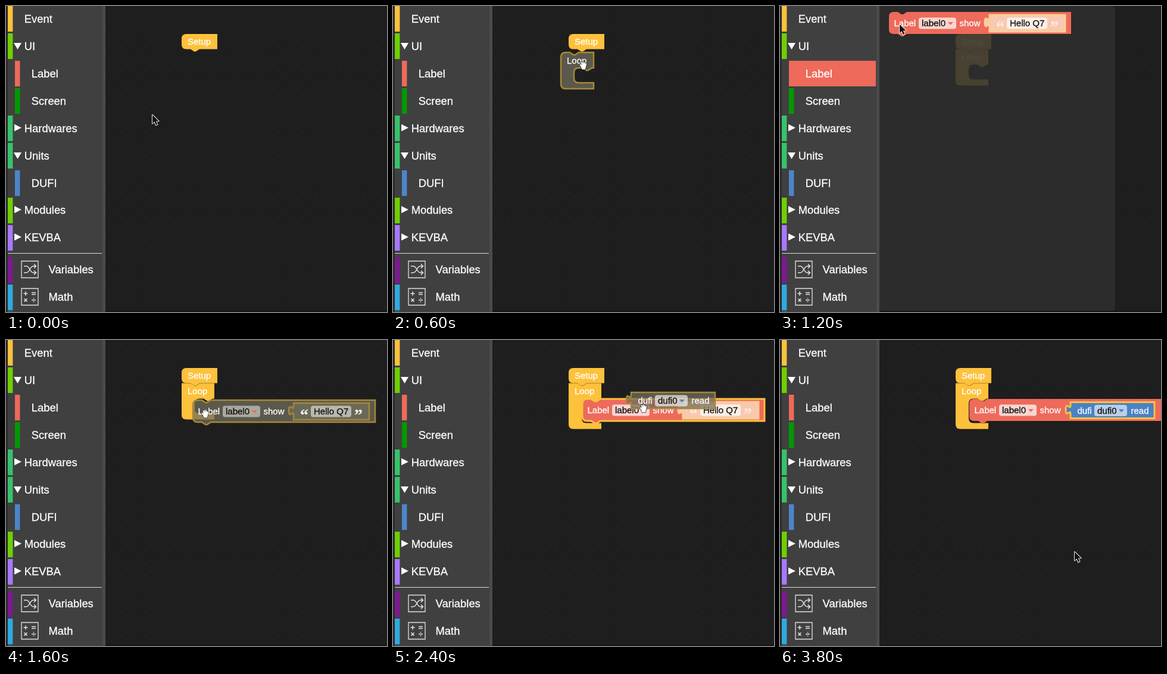
Recreate the animation shown at these times as an HTML page with a canvas. Size 640x514 px, loop 4 s.

```html
<!DOCTYPE html>
<html lang="en">
<head>
<meta charset="utf-8">
<title>Block editor</title>
<style>
html, body { margin: 0; width: 100%; height: 100%; overflow: hidden; background: #1e1e1e; }
canvas { display: block; width: 640px; height: 514px; }
</style>
</head>
<body>
<canvas id="stage" width="640" height="514"></canvas>
<script>
const c = document.getElementById('stage').getContext('2d');
const SANS = '"Liberation Sans", Arial, sans-serif';
const YELLOW = '#fdc13c', RED = '#ee6a5b', BLUE = '#4a82c6';
const GHOST = 'rgba(112,110,92,.74)', GOLD = '#a5883a';

// name, row centre, bar colour, indent, arrow
const rows = [
  ['Event', 21, YELLOW, 0],
  ['UI', 67, '#6ed000', 0, 'down'],
  ['Label', 113, RED, 1],
  ['Screen', 159, '#009a00', 1],
  ['Hardwares', 205, '#37c26c', 0, 'right'],
  ['Units', 251, '#37c26c', 0, 'down'],
  ['DUFI', 297, '#4d86cb', 1],
  ['Modules', 342.5, '#6ed000', 0, 'right'],
  ['KEVBA', 388.5, '#a978ff', 0, 'right'],
  ['Variables', 442.5, '#7d1a91', 2],
  ['Math', 488.5, '#30a9de', 2]
];

// Each step lasts 200 ms. Stage: 0 setup, 1 loop just placed, 2 loop, 3 label, 4 sensor.
const steps = [
  { stage: 0, cur: ['arrow', 246, 183] },
  { stage: 0, row: 0, open: 'event', cur: ['arrow', 92, 22] },
  { stage: 0, row: 0, open: 'event', cur: ['arrow', 221, 31] },
  { stage: 0, drag: ['loop', 282, 78], cur: ['hand', 313, 93] },
  { stage: 1, cur: ['hand', 322, 90] },
  { stage: 1, row: 2, cur: ['arrow', 61, 107] },
  { stage: 2, row: 2, open: 'label', cur: ['arrow', 201, 31] },
  { stage: 2, drag: ['label', 262, 78], cur: ['hand', 276, 94] },
  { stage: 2, drag: ['label', 314, 101], cur: ['hand', 328, 117] },
  { stage: 3, cur: ['hand', 332, 114] },
  { stage: 3, row: 6, cur: ['arrow', 94, 300] },
  { stage: 3, row: 6, open: 'sensor', cur: ['arrow', 198, 30] },
  { stage: 3, drag: ['sensor', 400, 88], cur: ['hand', 414, 108] },
  { stage: 3, drag: ['sensor', 491, 108], cur: ['hand', 504, 128] },
  { stage: 4, cur: ['hand', 500, 125] },
  { stage: 4, cur: ['hand', 500, 125] },
  { stage: 4, cur: ['arrow', 502, 220] },
  { stage: 4, cur: ['arrow', 495, 356] },
  { stage: 4, cur: ['arrow', 495, 356] },
  { stage: 4, cur: ['arrow', 495, 356] }
];

function rect(x, y, w, h, fill) {
  c.fillStyle = fill;
  c.fillRect(x, y, w, h);
}

function round(x, y, w, h, r, fill) {
  c.fillStyle = fill;
  c.beginPath();
  c.roundRect(x, y, w, h, r);
  c.fill();
}

function poly(fill, ...p) {
  c.fillStyle = fill;
  c.beginPath();
  for (let i = 0; i < p.length; i += 2) c.lineTo(p[i], p[i + 1]);
  c.closePath();
  c.fill();
}

// A hairline stroke gives the slightly heavy screen weight
function text(s, x, y, fill = '#fff', font = '15px ' + SANS) {
  c.font = font;
  c.fillStyle = c.strokeStyle = fill;
  c.lineWidth = .3;
  c.fillText(s, x, y);
  c.strokeText(s, x, y);
}

// Text centred on a block line
const word = (s, x, mid) => text(s, x + .5, mid + 5);

function field(s, x, mid, w, color, fill = 'rgba(255,255,255,.72)', drop = true) {
  round(x, mid - 9.5, w, 19, 4, fill);
  text(s, x + 5, mid + 5, '#111');
  if (drop) {
    const r = x + w;
    poly(color, r - 14, mid - 2, r - 5, mid - 2, r - 9.5, mid + 3);
  }
}

function shape(x, y, w, h, o) {
  const p = new Path2D();
  const r = o.tab ? 0 : 8;
  const head = o.joined ? 0 : r;
  p.moveTo(x, y + head);
  p.quadraticCurveTo(x, y, x + head, y);
  if (o.top) {
    p.lineTo(x + 15, y);
    p.lineTo(x + 21, y + 4);
    p.lineTo(x + 24, y + 4);
    p.lineTo(x + 30, y);
  }
  p.lineTo(x + w, y);
  if (o.mouth) {
    const a = y + 26, b = a + o.mouth;
    p.lineTo(x + w, a);
    p.lineTo(x + 52, a);
    p.lineTo(x + 46, a + 4);
    p.lineTo(x + 43, a + 4);
    p.lineTo(x + 37, a);
    p.lineTo(x + 30, a);
    p.quadraticCurveTo(x + 22, a, x + 22, a + 8);
    p.lineTo(x + 22, b - 8);
    p.quadraticCurveTo(x + 22, b, x + 30, b);
    p.lineTo(x + w, b);
  }
  p.lineTo(x + w, y + h);
  if (o.bottom) {
    p.lineTo(x + 30, y + h);
    p.lineTo(x + 24, y + h + 4);
    p.lineTo(x + 21, y + h + 4);
    p.lineTo(x + 15, y + h);
  }
  p.lineTo(x + r, y + h);
  p.quadraticCurveTo(x, y + h, x, y + h - r);
  if (o.tab) {
    p.lineTo(x, y + 20);
    p.bezierCurveTo(x, y + 10, x - 8, y + 28, x - 8, y + 12.5);
    p.bezierCurveTo(x - 8, y - 3, x, y + 15, x, y + 5);
  }
  p.closePath();
  return p;
}

function block(x, y, w, h, fill, o = {}) {
  const p = shape(x, y, w, h, o);
  if (!o.ghost) {
    c.save();
    c.translate(.7, .7);
    c.fillStyle = 'rgba(0,0,0,.2)';
    c.fill(p);
    c.restore();
  }
  c.fillStyle = o.ghost ? GHOST : fill;
  c.fill(p);
  if (o.line || o.ghost) {
    c.lineWidth = o.ghost ? 2.5 : 3;
    c.strokeStyle = o.ghost ? GOLD : o.line;
    c.stroke(p);
  }
}

function cBlock(x, y, w, mouth = 24, o = {}) {
  block(x, y, w, 36 + mouth, YELLOW, { mouth, ...o });
}

function setup() {
  block(295, 47, 60, 25.5, YELLOW, { bottom: true });
  word('Setup', 304.5, 60);
}

function loop(x, y, mouth = 25, o = {}) {
  cBlock(x, y, 55, mouth, { top: true, ...o });
  word('Loop', x + 9.5, y + 13.5);
}

function label(x, y, w, o = {}) {
  const mid = y + 19;
  block(x, y, w, 37, RED, { top: true, bottom: true, ...o });
  word('Label', x + 8, mid);
  field('label0', x + 50, mid, 63, RED, o.ghost ? '#aaa99f' : undefined);
  word('show', x + 118, mid);
  if (o.full) return;
  const quote = o.ghost ? '#f2f0e4' : '#fdebdc';
  block(x + 169, y + 5, 127, 28, '#f8c9b0', { tab: true, ghost: o.ghost, line: '#fbcf92' });
  const big = 'bold 28px "Liberation Serif", Times, serif';
  text('“', x + 180, mid + 15, quote, big);
  text('”', x + 271, mid + 15, quote, big);
  field('Hello Q7', x + 198, mid, 68, RED, o.ghost ? '#b9b8ac' : '#fdeee6', false);
}

function sensor(x, y, o = {}) {
  const mid = y + 14;
  block(x, y, 141, 27, BLUE, { tab: true, ...o });
  word('dufi', x + 11, mid);
  field('dufi0', x + 40, mid, 55, BLUE, 'rgba(255,255,255,.62)');
  word('read', x + 101, mid);
}

function eventBlocks() {
  const f = (s, x, mid, w, drop) => field(s, x, mid, w, '#efb43a', '#fff0cb', drop);
  loop(182.5, 10);

  cBlock(183, 98, 212);
  word('Button', 192, 111);
  f('A', 241, 111, 33);
  f('wasPressed', 284, 111, 104);

  block(183, 186, 255, 26, YELLOW, { tab: true });
  word('obtain button', 192.5, 199);
  f('A', 284, 199, 33);
  f('wasPressed', 327, 199, 104);

  cBlock(183, 237, 197);
  word('Button', 192, 250);
  f('A', 240, 250, 33);
  word('+', 280, 250);
  f('B', 292, 250, 34);
  word('press', 331.5, 250);

  block(183, 325, 142, 26, YELLOW, { tab: true });
  f('A', 188, 338, 33);
  word('is', 226, 338);
  f('pressed', 241, 338, 77);

  cBlock(183, 375, 163);
  word('timer callback', 192.5, 388);
  f('timer1', 288, 388, 53, false);

  block(183, 463, 352, 37, YELLOW, { top: true, bottom: true });
  word('Set', 192, 481);
  f('', 220, 481, 27);
  word('period', 252.5, 481);
  block(311, 468, 46, 27, '#b3daf0', { tab: true });
  field('100', 316.5, 482, 36, BLUE, '#d9eefa', false);
  word('ms mode', 367.5, 481);
  f('PERIODIC', 434, 481, 95);
}

function flyout(kind) {
  round(167, 0, 396, 514, [0, 8, 8, 0], 'rgba(46,46,46,.87)');
  if (kind === 'event') eventBlocks();
  if (kind === 'label') label(183, 10, 306);
  if (kind === 'sensor') sensor(183, 10);
}

function grid() {
  rect(0, 0, 640, 514, '#1e1e1e');
  for (let x = 172; x < 640; x += 20.45)
    for (let y = 6.5; y < 512; y += 20.45) rect(Math.round(x), Math.round(y), 1, 1, '#4a4a4a');
}

function strokes(d, width = 1.5) {
  c.strokeStyle = '#e2e2e2';
  c.lineWidth = width;
  c.stroke(new Path2D(d));
}

function sidebar(s) {
  rect(0, 0, 167, 514, '#404040');
  rect(0, 0, 3, 514, '#2c2c2c');
  rect(162, 0, 5, 514, '#4b4b4b');
  rows.forEach(([name, mid, color, indent, arrow], i) => {
    const bar = indent === 1 ? 15 : 3;
    const on = s.row === i;
    const top = Math.round(mid - 21);
    if (on) rect(bar, top, 161 - bar, 43, s.open ? color : '#e3e3e3');
    rect(bar, top, 8.4, 43, color);
    if (arrow === 'down') poly('#fff', 13, mid - 5, 26, mid - 5, 19.5, mid + 6);
    if (arrow === 'right') poly('#fff', 14, mid - 6.5, 26, mid - .5, 14, mid + 5.5);
    text(name, [30.8, 42.8, 71.5][indent], mid + 6.5, on && !s.open ? '#222' : '#fff', '18.4px ' + SANS);
  });
  rect(3, 415, 158, 1, '#dcdcdc');
  rect(3, 512, 8.4, 2, '#2a6072');
  strokes('M26 428.5h28v28h-28z M26 474.5h28v28h-28z', 1.3);
  strokes('M30 437h4c6 0 6 11 12 11h4 M30 448h4c6 0 6-11 12-11h4 M47 433.5l3.5 3.5-3.5 3.5 M47 444.5l3.5 3.5-3.5 3.5');
  strokes('M29.5 483h7 M33 479.5v7 M43 481.5h7 M43 484.5h7 M30.5 491.5l5 5 M35.5 491.5l-5 5 M43 494h7 M46.5 490.5v1.6 M46.5 496v1.6');
}

const arrowPath = new Path2D('M0 0V16L3.8 12.6 6.6 19 9.4 17.8 6.6 11.6H11.8Z');
const handPath = new Path2D('M3 10L.8 7.2C0 5.6 2 4.6 3.2 6L4.2 7.2 3 2.6C2.8 .8 4.8 .6 5.2 2.2L6 4.6V1.6C6.2 0 8.2 0 8.3 1.6V4.6L9 2.2C9.5 .8 11.3 1.2 11 2.8L10.8 5.4 11.6 4C12.4 2.8 13.8 3.4 13.4 5L12.2 10.5 11 15H5Z');

function cursor([kind, x, y]) {
  const arrow = kind === 'arrow';
  const p = arrow ? arrowPath : handPath;
  c.save();
  c.translate(x, y);
  c.scale(.9, .9);
  c.lineJoin = 'round';
  c.lineWidth = arrow ? 2 : 1.6;
  c.strokeStyle = arrow ? '#fff' : '#222';
  c.stroke(p);
  c.fillStyle = arrow ? '#111' : '#fff';
  c.fill(p);
  c.restore();
}

function program(stage) {
  if (stage === 1) {
    setup();
    loop(295, 73, 25, { line: YELLOW, joined: true });
    return;
  }
  if (stage > 1) loop(295, 72.5, stage > 2 ? 41 : 25, { joined: true });
  setup();
  if (stage === 3) label(318, 99, 306, { line: YELLOW });
  if (stage === 4) {
    label(318, 99, 340, { full: true });
    sensor(488, 104.5, { line: YELLOW });
  }
}

function draw(s) {
  grid();
  program(s.stage);
  if (s.open) flyout(s.open);
  rect(167, 512, 473, 2, '#151515');
  sidebar(s);
  if (s.drag) {
    const [kind, x, y] = s.drag;
    const o = { ghost: true };
    if (kind === 'loop') loop(x, y, 25, o);
    if (kind === 'label') label(x, y, 306, o);
    if (kind === 'sensor') sensor(x, y, o);
  }
  cursor(s.cur);
}

const start = performance.now();
let shown = -1;
function tick() {
  const i = Math.floor((performance.now() - start) % 4000 / 200);
  if (i !== shown) draw(steps[shown = i]);
  requestAnimationFrame(tick);
}
tick();
</script>
</body>
</html>
```
